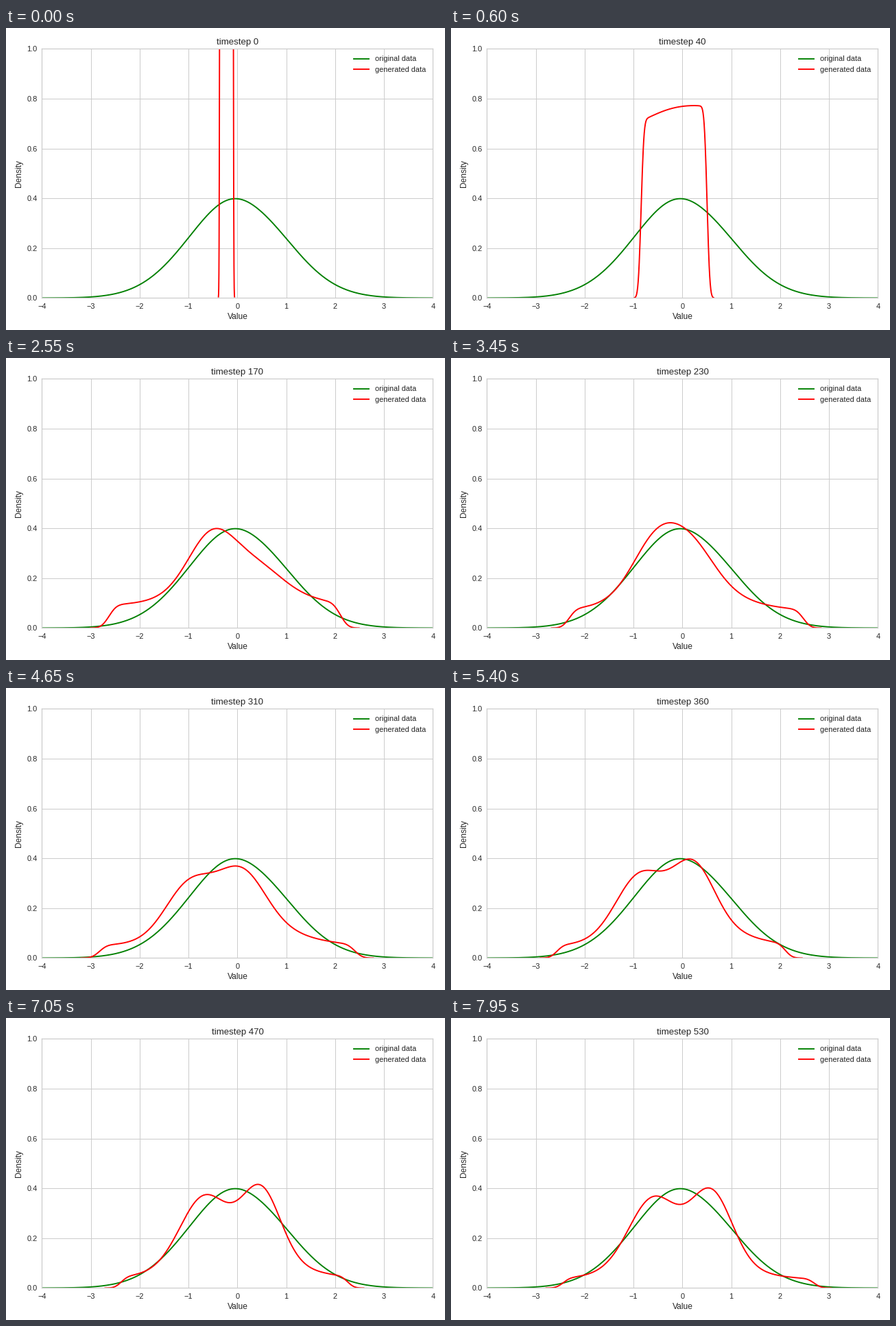
Write a matplotlib script that moves like this. It is 640 px wide and 440 px high and loops after 8 s.

```python
import math

import matplotlib.pyplot as plt
import numpy as np
from matplotlib.animation import FuncAnimation

WIDTH, HEIGHT, DPI = 640, 440, 80
PX = 72 / DPI  # points per pixel
INK, GRID = "#262626", "#cccccc"
FRAME_MS, FRAMES, FRAMES_PER_STEP = 50, 160, 3
BANDWIDTH = 0.116   # kernel width relative to the spread of the samples
HUMP_WIDTH = 0.48
PEDESTAL = 0.1

plt.rcParams.update({
    "font.family": "Liberation Sans",
    "text.color": INK,
    "axes.edgecolor": GRID,
    "axes.linewidth": 1.25 * PX,
    "axes.axisbelow": True,
    "grid.color": GRID,
    "grid.linewidth": 1 * PX,
})

# Step: sample range, floor height, left hump (centre, height),
# right hump (centre, height, width).
STAGES = {
    0: (-.362, -.088, 3.5, -.2, 0, .7, 0, .48),
    9: (-1.453, 1.242, .265, -.2, .03, .7, .05, .48),
    17: (-2.632, 2.112, .09, -.52, .21, .45, .065, .48),
    23: (-2.323, 2.477, .07, -.55, .195, .2, .148, .48),
    31: (-2.828, 2.407, .05, -1, .19, .08, .2, .48),
    41: (-2.323, 1.818, .045, -.78, .26, .37, .275, .37),
    53: (-2.449, 2.702, .035, -.62, .245, .6, .27, .416),
}


def bell(x, centre=0, width=1):
    return np.exp(-((x - centre) / width) ** 2 / 2)


def real_density(x):
    """Standard normal with its top leaning slightly left."""
    lean = 0.05 * np.exp(-2 * (x - 0.2) ** 2)
    return bell(x + lean) / math.sqrt(2 * math.pi)


normal_cdf = np.vectorize(lambda z: 0.5 * (1 + math.erf(z / math.sqrt(2))))


def blend_stages(step):
    """Mix neighbouring stages; heights are mixed as height times range width."""
    table = np.array(list(STAGES.values()), float)
    heights = [2, 4, 6]
    table[:, heights] *= (table[:, 1] - table[:, 0])[:, None]
    mix = np.array([np.interp(step, list(STAGES), column) for column in table.T])
    mix[heights] /= mix[1] - mix[0]
    return mix


def generated_density(step):
    low, high, floor, left, left_height, right, right_height, right_width = blend_stages(step)

    def profile(x):
        return (floor + PEDESTAL * bell(x)
                + left_height * bell(x, left, HUMP_WIDTH)
                + right_height * bell(x, right, right_width))

    inside = np.linspace(low, high, 200)
    weights = profile(inside)
    mean = np.average(inside, weights=weights)
    soft = BANDWIDTH * math.sqrt(np.average((inside - mean) ** 2, weights=weights))

    x = np.linspace(low - 3 * soft, high + 3 * soft, 300)
    edges = normal_cdf((x - low) / soft) * normal_cdf((high - x) / soft)
    return x, profile(x) * edges


fig = plt.figure(figsize=(WIDTH / DPI, HEIGHT / DPI), dpi=DPI, facecolor="white")
ax = fig.add_axes([52.45 / WIDTH, 1 - 393.45 / HEIGHT, 570 / WIDTH, 363 / HEIGHT])
ax.set(xlim=(-4, 4), ylim=(0, 1), xticks=range(-4, 5), yticks=np.arange(6) / 5)
ax.grid(True)
ax.tick_params(length=0, pad=7.3 * PX, labelsize=11 * PX, labelcolor=INK)
ax.tick_params(axis="y", pad=6.7 * PX)

fig.text(337.4 / WIDTH, 1 - 424.3 / HEIGHT, "Value", size=12 * PX,
         ha="center", va="baseline")
fig.text(22 / WIDTH, 1 - 212 / HEIGHT, "Density", size=12 * PX, rotation=90,
         rotation_mode="anchor", ha="center", va="baseline")
title = ax.set_title("", size=13.2 * PX, pad=6 * PX)

span = np.linspace(-4, 4, 400)
ax.plot(span, real_density(span), color="green", lw=1.9 * PX, label="original data")
curve, = ax.plot([], [], color="red", lw=1.9 * PX, label="generated data")
ax.legend(loc="upper right", frameon=False, fontsize=11 * PX)


def update(frame):
    step = frame // FRAMES_PER_STEP
    curve.set_data(*generated_density(step))
    title.set_text(f"timestep {step * 10}")
    return curve, title


anim = FuncAnimation(fig, update, frames=FRAMES, interval=FRAME_MS,
                     repeat=True, repeat_delay=0, blit=False)
plt.show()
```
